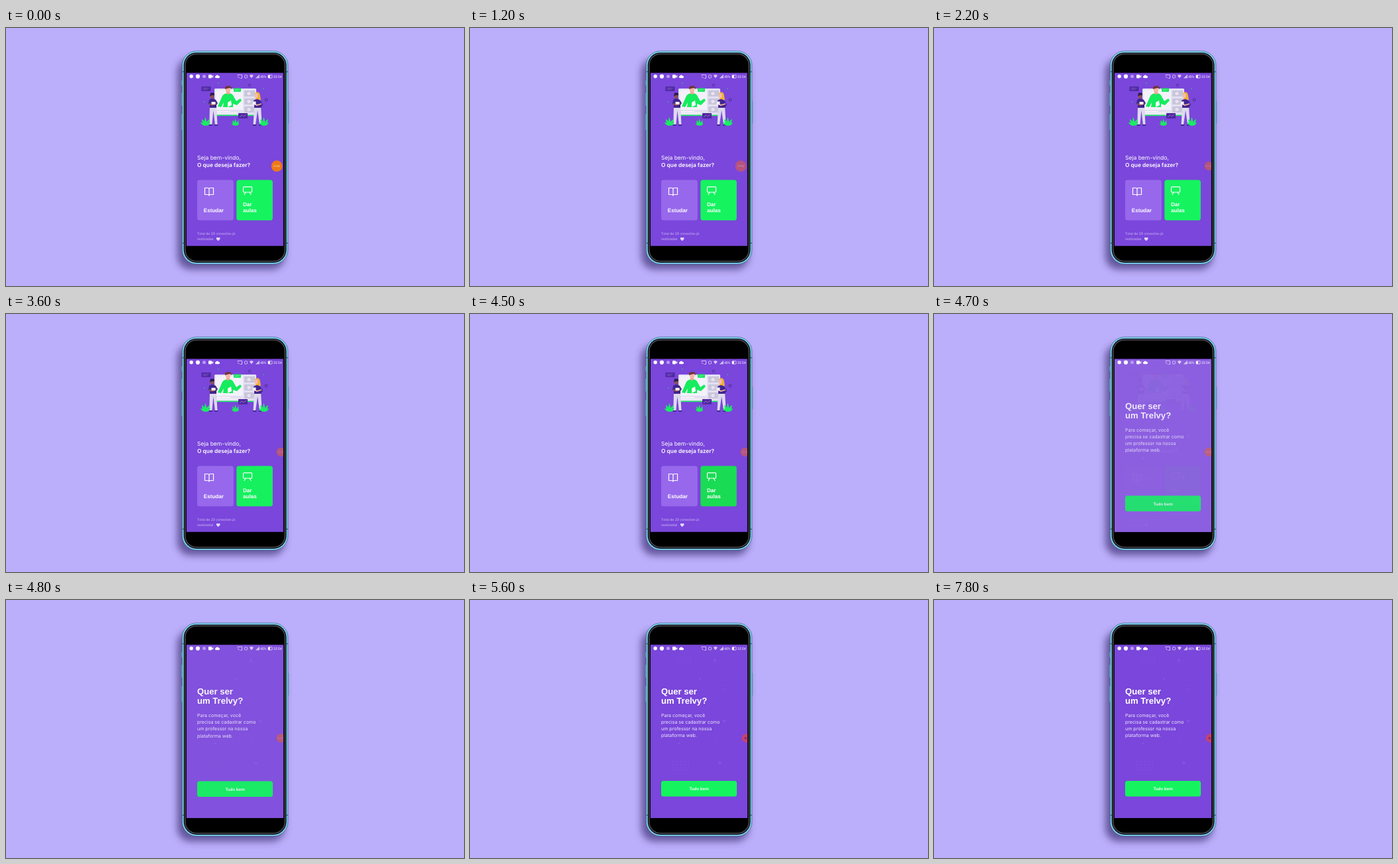
An HTML page that plays this animation: 690 px wide and 388 px high, repeating every 8000 ms.

```html
<!DOCTYPE html>
<html lang="pt-BR">
<head>
<meta charset="utf-8">
<title>App</title>
<style>
  html, body { margin: 0; width: 690px; height: 388px; overflow: hidden; background: #bbaefa; }
  svg { display: block; }
  text { fill: #fff; font-family: Inter, "Open Sans", sans-serif; text-rendering: geometricPrecision; }
  .head { font: 700 13.1px "Liberation Sans", Arial, sans-serif; }
  .label { font: 700 8.1px "Liberation Sans", Arial, sans-serif; }
  .hello { font-size: 8.5px; }
  .ask { font-size: 8.4px; font-weight: 600; }
  .small { font-size: 5.1px; fill: #cdb8f6; }
  .para { font-size: 7.05px; fill: #f0eafc; }
  .btn { font-size: 6.2px; font-weight: 600; text-anchor: middle; }
  .bar { font: 5px Roboto, sans-serif; }
  .line { fill: none; stroke: #fff; stroke-width: 1.2; stroke-linecap: round; stroke-linejoin: round; }
  .thin { fill: none; stroke: #e4d9fb; stroke-width: .8; }
</style>
</head>
<body>
<svg width="690" height="388" viewBox="0 0 690 388">
  <defs>
    <clipPath id="screen"><rect x="272" y="67.600" width="145.800" height="260.100"/></clipPath>
    <filter id="blur" x="-20%" y="-20%" width="140%" height="140%"><feGaussianBlur stdDeviation="5.5"/></filter>
    <pattern id="dots" width="4" height="4" patternUnits="userSpaceOnUse"><circle cx="1" cy="1" r=".6" fill="#a27df0"/></pattern>
    <g id="leaf" fill="#19ee62">
      <path d="M0 0Q-3-6-1-13Q3-6 0 0Z"/>
      <path d="M0 0Q-6-3-6-10Q0-7 0 0Z"/>
      <path d="M0 0Q5-3 6-10Q0-7 0 0Z"/>
      <path d="M0 0Q-6 0-8-5Q-3-5 0 0Q5 0 7-5Q3-5 0 0Z"/>
    </g>
  </defs>

  <rect width="690" height="388" fill="#bbaefa"/>

  <!-- phone -->
  <rect x="258" y="46" width="162" height="317" rx="20" fill="#433579" opacity=".72" filter="url(#blur)"/>
  <g fill="#79c9ec" stroke="#3d7391" stroke-width=".4">
    <rect x="264.300" y="78.500" width="3" height="8" rx="1"/>
    <rect x="264.300" y="97" width="3" height="20" rx="1"/>
    <rect x="264.300" y="129" width="3" height="24.500" rx="1"/>
    <rect x="422.800" y="109.500" width="2.900" height="34" rx="1"/>
  </g>
  <rect x="265.500" y="34.700" width="159.200" height="320.400" rx="21.500" fill="#7fd2f3" stroke="#2c566e" stroke-width=".6"/>
  <path d="M265.300 65.800h3M422 65.800h3M265.300 323.500h3M422 323.500h3" stroke="#2c566e" stroke-width="1"/>
  <rect x="267.700" y="36.900" width="154.800" height="316" rx="19.300" fill="#0b1116"/>
  <rect x="269.900" y="39" width="150.400" height="311.800" rx="17" fill="#000" stroke="#4b4c52" stroke-width="1.500"/>

  <g clip-path="url(#screen)">
    <rect x="272" y="67" width="146" height="262" fill="#7a46db"/>

    <!-- home -->
    <g id="home">
      <g id="art">
        <rect x="314" y="91" width="63" height="41" rx="1.500" fill="#e4e0f2"/>
        <rect x="316" y="93" width="41" height="30" fill="#f3f1fa"/>
        <g fill="#c9c5da">
          <rect x="359" y="94" width="16" height="9"/>
          <rect x="359" y="106" width="16" height="9"/>
          <rect x="359" y="118" width="16" height="9"/>
        </g>
        <g fill="#e6e2f0">
          <circle cx="366" cy="98.500" r="2.600"/><circle cx="366" cy="110.500" r="2.600"/><circle cx="366" cy="122.500" r="2.600"/>
        </g>
        <path d="M318 125.500h20M318 128h31" stroke="#fff" stroke-width="1.100"/>
        <rect x="314" y="130.600" width="63" height="1.600" fill="#17e962"/>
        <!-- teacher -->
        <path d="M319 118L326 102Q329 98 335 98Q341 98 343 103L347 110L353 106L355 109L348 116L342 114V119H327L328 112L324 119Z" fill="#15ec5e"/>
        <path d="M332 93h5v6q-2 2-5 0Z" fill="#eba58e"/>
        <ellipse cx="334.500" cy="92.700" rx="3.600" ry="4.400" fill="#f5b8a2"/>
        <path d="M330 92Q329 87 334 87.200Q340 86 340 92L337.500 90Q333 91 330 92Z" fill="#713536"/>
        <path d="M334 112l5-3 1 7-6 3Z" fill="#fff"/>
        <rect x="343" y="90.500" width="11" height="5.500" rx=".8" fill="#18e562"/>
        <path d="M345 92.500h7M345 94.200h5" stroke="#7af3a5" stroke-width=".6"/>
        <!-- students -->
        <path d="M307 118h10l1.500 27h-3.600l-2.500-21-2 21h-4Z" fill="#dedaee"/>
        <path d="M306 108q5-4 10 0l3 5-2 3v4h-10v-5l-2-1Z" fill="#40258f"/>
        <path d="M306 114l5 2 6-3" fill="none" stroke="#8a5046" stroke-width="2"/>
        <rect x="309.500" y="111" width="6" height="4" fill="#f3eff9"/>
        <ellipse cx="310.500" cy="102.300" rx="2.700" ry="3.800" fill="#8d5146"/>
        <path d="M307.500 102.500q-1-6 3.500-5.200q3.600 0 3 4q-4-1-6.500 1.200Z" fill="#2b1b4b"/>
        <path d="M306 146h5M314 146h5" stroke="#32207b" stroke-width="1.500"/>
        <path d="M374 118h10l1.500 27h-3.500l-3-21-3 21h-3.500Z" fill="#dedaee"/>
        <path d="M375 98q4.500-4 7.500 1l1.500 9-4 1-4-2Z" fill="#f0ae3c"/>
        <ellipse cx="377.300" cy="101.700" rx="2.300" ry="3.500" fill="#f6bda8"/>
        <path d="M373 109q5-4 10 0l4 6-3 5h-10v-4l-2-2Z" fill="#40258f"/>
        <path d="M372 113l6 3 7-2" fill="none" stroke="#f3b5a0" stroke-width="1.800"/>
        <rect x="371.500" y="110.500" width="5" height="5" fill="#f3eff9"/>
        <path d="M372 146h5M381 146h5" stroke="#32207b" stroke-width="1.500"/>
        <!-- floating panels -->
        <g fill="#50299f">
          <rect x="294.500" y="88" width="14" height="7" rx=".7"/>
          <rect x="350" y="128" width="14" height="8" rx=".7"/>
          <circle cx="367" cy="86" r="2.100"/><circle cx="392" cy="108" r="2.200"/>
        </g>
        <path d="M296.500 90.500h9M296.500 92.700h7" stroke="#8c65d8" stroke-width=".7"/>
        <path d="M352 134l3-3 3 2 4-3" fill="none" stroke="#a58be8" stroke-width=".7"/>
        <path d="M366 86h2M391 108h2" stroke="#c5b4ee" stroke-width=".7"/>
        <g fill="#1ae765">
          <circle cx="320" cy="83" r=".8"/><circle cx="299" cy="111" r=".8"/><circle cx="388" cy="91" r=".8"/>
        </g>
        <use href="#leaf" x="301" y="147"/>
        <use href="#leaf" transform="translate(346 147) scale(.8)"/>
        <use href="#leaf" x="389" y="147"/>
      </g>

      <text class="hello" x="288" y="197.500">Seja bem-vindo,</text>
      <text class="ask" x="288" y="208.500">O que deseja fazer?</text>

      <rect x="288" y="228.500" width="54.800" height="60.800" rx="3.500" fill="#9768ec"/>
      <path class="line" d="M306 242.500Q306 240.500 303.500 240.500H299.500V250.500H304Q306 250.500 306 252Q306 250.500 308 250.500H312.500V240.500H308.500Q306 240.500 306 242.500V251.500"/>
      <text class="label" x="297.800" y="276.600">Estudar</text>

      <rect id="card" x="347.300" y="228.500" width="54.500" height="60.800" rx="3.500"/>
      <path class="line" d="M358.500 238.800H369.500Q370.500 238.800 370.500 239.800V246Q370.500 247 369.500 247H358.500Q357.500 247 357.500 246V239.800Q357.500 238.800 358.500 238.800ZM361 247.200L359 250.500M367 247.200L369 250.500"/>
      <text class="label" x="357" y="267.800">Dar</text>
      <text class="label" x="357" y="276.600">aulas</text>

      <text class="small" x="288" y="311">Total de 29 conexões já</text>
      <text class="small" x="288" y="319.300">realizadas</text>
      <path d="M319.700 320.300L317.200 317.700Q316.200 316.200 317.300 315.200Q318.700 314.300 319.700 315.700Q320.700 314.300 322.100 315.200Q323.200 316.200 322.200 317.700Z" fill="#e3d8fa"/>
    </g>

    <!-- invitation -->
    <g id="invite">
      <rect id="sheet" x="272" y="67" width="146" height="270"/>
      <g id="content">
        <g opacity=".55">
          <g fill="url(#dots)">
            <rect width="22" height="10" transform="translate(311 85)"/>
            <rect width="26" height="14" transform="translate(304 242)"/>
            <rect width="7" height="10" transform="translate(380 128)"/>
            <rect width="7" height="10" transform="translate(368 205)"/>
          </g>
          <g fill="none" stroke="#a17cf0" stroke-width=".8">
            <circle cx="369" cy="91" r="1.600"/><circle cx="376" cy="245" r="1.800"/>
            <circle cx="383" cy="182" r="1.400"/><circle cx="315" cy="215.500" r="1"/>
            <circle cx="347" cy="118.500" r=".8"/>
          </g>
        </g>
        <text class="head" x="288" y="141.700">Quer ser</text>
        <text class="head" x="288" y="155.700">um Trelvy?</text>
        <text class="para" x="288" y="176">Para começar, você</text>
        <text class="para" x="288" y="185.500">precisa se cadastrar como</text>
        <text class="para" x="288" y="196">um professor na nossa</text>
        <text class="para" x="288" y="206.200">plataforma web.</text>
        <rect x="288" y="272" width="114" height="23.500" rx="3.500" fill="#15f35f"/>
        <text class="btn" x="345" y="286.300">Tudo bem</text>
      </g>
    </g>

    <!-- status bar -->
    <g fill="#fff">
      <circle cx="279.200" cy="72.800" r="2.700"/>
      <circle cx="289" cy="72.800" r="3.100"/>
      <circle cx="298.500" cy="72.800" r="2.500" fill="#b99bf0"/>
      <rect x="305" y="70.300" width="5" height="5.200" rx="1"/>
      <path d="M309.500 73l2.700-2v4Z"/>
      <path d="M316.200 75.200a1.600 1.600 0 0 1 0-3.100a2.300 2.300 0 0 1 4.200-.1a1.600 1.600 0 0 1 .2 3.200Z"/>
      <path d="M375.800 75.600h6v-5.600Z" opacity=".65"/>
      <path d="M366.800 71.500q3-2.400 6 0l-3 4Z" opacity=".7"/>
    </g>
    <path class="thin" d="M349 71.800V70.500H355.500V75.500H353M349 73.200q2 .3 2.300 2.300"/>
    <circle class="thin" cx="361.500" cy="73" r="2.300"/>
    <rect class="thin" x="395" y="70.800" width="6" height="4.400" rx=".7"/>
    <rect x="395" y="71" width="2.700" height="4" fill="#fff"/>
    <text class="bar" x="383" y="74.900">40%</text>
    <text class="bar" x="403" y="74.900">22:54</text>

    <!-- recorder bubble -->
    <g id="bubble">
      <circle id="disc"/>
      <text id="clock" x="0" y="1.500" text-anchor="middle" font-size="4">0:04</text>
      <rect id="stop" x="-2.300" y="-1.500" width="3" height="3" rx=".8" fill="#8c1d3c"/>
    </g>
  </g>
</svg>
<script>
  const LOOP = 8000, STEP = 100;
  const el = id => document.getElementById(id);
  const set = (id, attrs) => {
    for (const key in attrs) el(id).setAttribute(key, attrs[key]);
  };
  const ramp = (t, from, to) => Math.min(1, Math.max(0, (t - from) / (to - from)));
  const mix = (a, b, k) => a + (b - a) * k;
  const blend = (a, b, k) => a.map((v, i) => Math.round(mix(v, b[i], k)));
  const rgb = color => `rgb(${color})`;

  const PURPLE = [122, 70, 219], WHITE = [255, 255, 255];
  const GREEN = [21, 243, 95], PRESSED = [26, 219, 84];
  const ORANGE = [238, 120, 24], CORAL = [225, 95, 60], RED = [222, 66, 82];

  // time, sheet whiteness, sheet alpha, content alpha, vertical shift
  const OPENING = [
    [0, 0, 0, 0, 8],
    [4600, .38, .62, .5, 7.3],
    [4700, .14, .96, .86, 1.3],
    [4800, .06, 1, .95, .4],
    [4900, .02, 1, .99, .1],
    [5000, 0, 1, 1, 0]
  ];

  function draw(time) {
    const t = Math.floor(time / STEP) * STEP;

    set('card', { fill: rgb(blend(GREEN, PRESSED, ramp(t, 3500, 4400))) });

    const [, white, alpha, content, dy] = OPENING.filter(row => row[0] <= t).pop();
    set('invite', { transform: `translate(0 ${dy})`, visibility: alpha ? 'visible' : 'hidden' });
    set('sheet', { fill: rgb(blend(PURPLE, WHITE, white)), opacity: alpha });
    set('content', { opacity: content });

    const fade = ramp(t, 0, 900), dock = ramp(t, 1400, 2200), tuck = ramp(t, 5200, 5400);
    set('bubble', {
      transform: `translate(${408 + 6 * dock + 2 * tuck} 207.700)`,
      opacity: mix(mix(1, .58, fade), .75, tuck)
    });
    set('disc', {
      r: mix(8.4, 6.6, dock),
      fill: rgb(blend(blend(ORANGE, CORAL, fade), RED, tuck))
    });
    set('clock', { opacity: mix(.9, .45, dock) * (1 - tuck) });
    set('stop', { opacity: tuck });
  }

  const start = performance.now();
  function frame() {
    draw((performance.now() - start) % LOOP);
    requestAnimationFrame(frame);
  }
  draw(0);
  requestAnimationFrame(frame);
</script>
</body>
</html>
```
